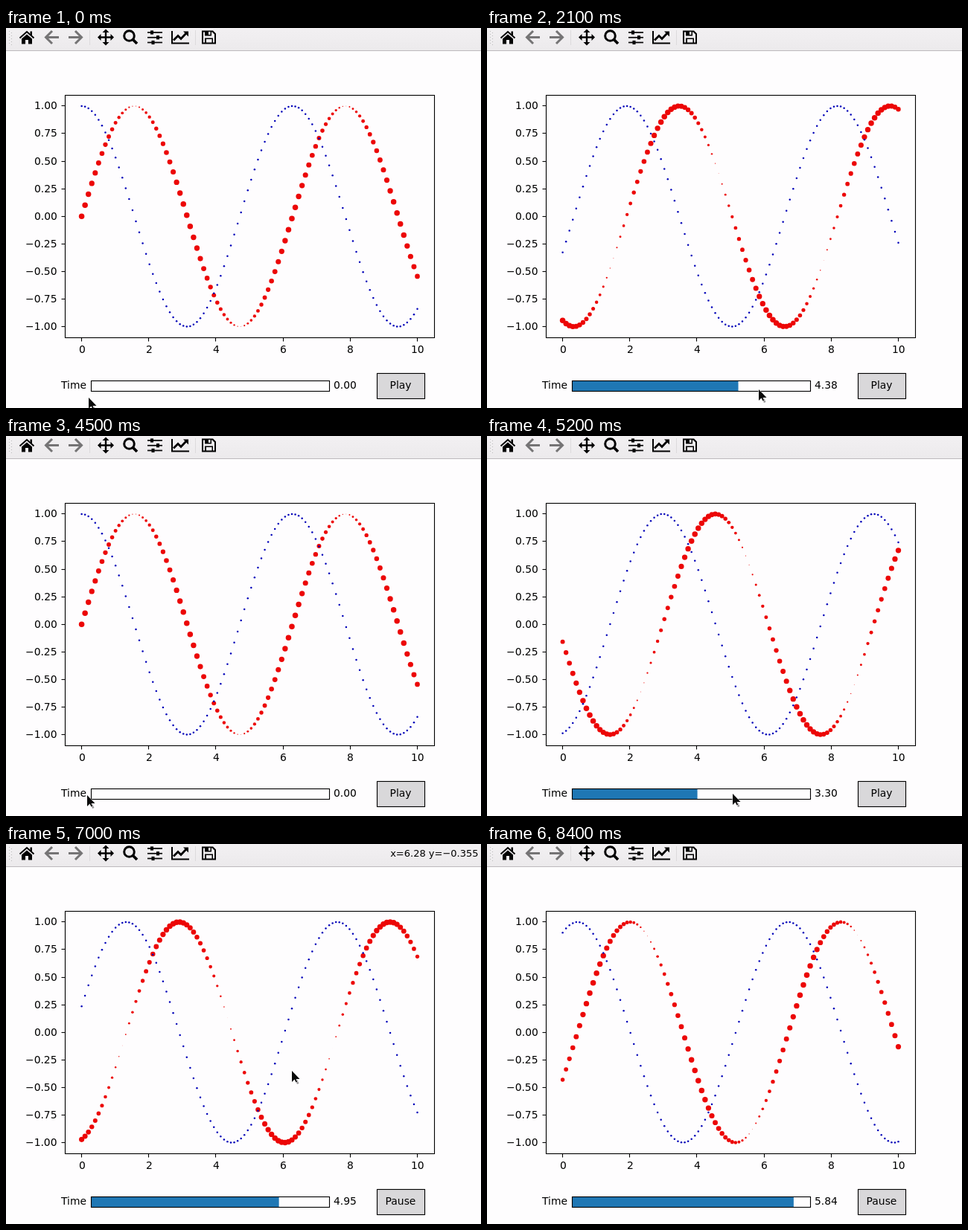
These frames come from a looping animation (638 by 511 pixels, 8600 ms). An HTML page with a canvas:

```html
<!DOCTYPE html>
<html lang="en">
<head>
<meta charset="utf-8">
<title>Scatter and line animation</title>
<style>
html, body { margin: 0; width: 100%; height: 100%; overflow: hidden; background: #fefdfe; }
canvas { display: block; }
</style>
</head>
<body>
<canvas id="stage" width="638" height="511"></canvas>
<script>
const ctx = document.getElementById('stage').getContext('2d');
const LOOP = 8600, TICK = 100, STEPS = 99, POINTS = 100;
const FONT = '"DejaVu Sans", sans-serif';
const slider = { x: 114.5, y: 474.5, w: 320, h: 14 };
const button = { x: 498.5, y: 464.5, w: 64, h: 34 };
const plot = { x: 79.5, y: 90.5, w: 496, h: 326 };
const start = performance.now();

// Cursor moves, each eased to its end point
const home = { x: 111, y: 497 };
const moves = [
  { from: 200, to: 500, x: 120, y: 494 },
  { from: 700, to: 800, x: 122, y: 482 },
  { from: 1300, to: 2250, x: 382, y: 486 },
  { from: 2300, to: 3100, x: 302, y: 474 },
  { from: 3200, to: 4400, x: 109, y: 483 },
  { from: 4500, to: 5900, x: 550, y: 478 },
  { from: 6400, to: 7600, x: 218, y: 131 },
  { from: 7700, to: 8000, x: 190, y: -60 }
];
const DRAG = 1300, RELEASE = 71, PLAY = 6200;

const clamp = (v, lo, hi) => Math.min(hi, Math.max(lo, v));
const smooth = u => u * u * (3 - 2 * u);
const inside = (p, b) => p.x >= b.x && p.x <= b.x + b.w && p.y >= b.y && p.y <= b.y + b.h;

function cursorAt(ms) {
  let { x, y } = home;
  for (const m of moves) {
    const s = smooth(clamp((ms - m.from) / (m.to - m.from), 0, 1));
    x += (m.x - x) * s;
    y += (m.y - y) * s;
  }
  return { x, y };
}

// The slider trails the drag by one tick, then playback adds one step per tick
function stepAt(ms) {
  if (ms < DRAG) return 0;
  if (ms > PLAY) return RELEASE + (ms - PLAY) / TICK - 1;
  const dragged = Math.round((cursorAt(ms - TICK).x - slider.x) / slider.w * STEPS);
  return clamp(dragged, 0, ms < moves[5].from ? STEPS : RELEASE);
}

const px = x => 101.6 + x * 45.09;
const py = y => 253.2 - y * 148.3;
const snap = v => Math.floor(v) + 0.5;

function text(str, x, y, align = 'left', size = 13.89) {
  ctx.font = size + 'px ' + FONT;
  ctx.textAlign = align;
  ctx.fillStyle = '#000';
  ctx.fillText(str, x, y);
}

function rect(x, y, w, h, fill) {
  ctx.fillStyle = fill;
  ctx.fillRect(x, y, w, h);
}

function box({ x, y, w, h }) {
  ctx.strokeStyle = '#000';
  ctx.lineWidth = 1.11;
  ctx.strokeRect(x, y, w, h);
}

function dot(x, y, r, fill) {
  ctx.fillStyle = fill;
  ctx.beginPath();
  ctx.arc(x, y, r, 0, 2 * Math.PI);
  ctx.fill();
}

function line(color, width, ...pts) {
  ctx.strokeStyle = color;
  ctx.lineWidth = width;
  ctx.beginPath();
  for (let i = 0; i < pts.length; i += 2) ctx.lineTo(pts[i], pts[i + 1]);
  ctx.stroke();
}

function shape(d, fill) {
  ctx.fillStyle = fill;
  ctx.fill(new Path2D(d), 'evenodd');
}

// Icon pieces reused by mirroring or turning about a centre
function turned(x, y, angle, paint) {
  ctx.save();
  ctx.translate(x, y);
  ctx.rotate(angle);
  paint();
  ctx.restore();
}

function toolbar() {
  const ink = '#000', dim = '#757475';
  const shade = ctx.createLinearGradient(0, 0, 0, 30);
  shade.addColorStop(0, '#f2f0f2');
  shade.addColorStop(1, '#eceaec');
  rect(0, 0, 638, 30, shade);
  rect(0, 30, 638, 1, '#bdbabd');
  for (let y = 4; y < 23; y += 4) {
    rect(4, y, 1, 1, '#bbb');
    rect(7, y + 2, 1, 1, '#bbb');
  }
  for (const x of [112, 254]) rect(x, 3, 1, 20, '#dcdadc');

  // home
  line(ink, 2, 18.5, 13.5, 28, 5, 37.5, 13.5);
  shape('M28 8.5L35 14.5V21.5H30V16H26V21.5H21V14.5ZM32.5 4.5H35V10.5L32.5 8.5Z', ink);

  // back and forward
  for (const [x, angle] of [[62, 0], [93, Math.PI]]) {
    turned(x, 12.5, angle, () => {
      line(dim, 3, 0, -8.5, -8.5, 0, 0, 8.5);
      line(dim, 3, -8, 0, 9, 0);
    });
  }

  // pan
  for (let i = 0; i < 4; i++) {
    turned(134, 12.5, i * Math.PI / 2, () => {
      line(ink, 2.4, 0, 0, 0, -8);
      shape('M0 -11L4.5 -6.5H-4.5Z', ink);
    });
  }

  // zoom
  ctx.strokeStyle = ink;
  ctx.lineWidth = 3;
  ctx.beginPath();
  ctx.arc(165.5, 10.5, 6.8, 0, 2 * Math.PI);
  ctx.stroke();
  line(ink, 3.8, 170, 15, 176, 21);

  // subplots
  [196, 204, 197.5].forEach((x, i) => {
    const y = 6 + i * 6.75;
    line(ink, 1.7, 190, y, 210, y);
    rect(x - 2, y - 2.6, 4, 5.2, ink);
  });

  // chart
  line(ink, 2, 223, 4, 223, 20.5, 246, 20.5);
  line(ink, 2.8, 225, 16.5, 231, 10.5, 235, 14.5, 242, 7);
  shape('M238 4.5H245V11.5Z', ink);

  // save
  shape('M263 3.5H278L282 7.5V21.5H263ZM265 5.5V19.5H280V8.5L277 5.5H276V10.5H267V5.5ZM267 13.5H278V19.5H267ZM269 15V19.5H276.5V15ZM272 5H274.5V9H272Z', ink);
}

function axes() {
  box(plot);
  for (let x = 0; x <= 10; x += 2) {
    const X = snap(px(x));
    line('#000', 1.11, X, 417, X, 421.5);
    text(String(x), Math.floor(px(x) - (x < 10 ? 3.5 : 8)), 437);
  }
  for (let i = -4; i <= 4; i++) {
    const Y = snap(py(i / 4));
    line('#000', 1.11, 74.5, Y, 79, Y);
    const label = Math.abs(i / 4).toFixed(2);
    if (i < 0) text('\u2212' + label, 26, Math.round(Y + 4.6));
    else text(label, 38, Math.round(Y + 4.6));
  }
}

function series(t) {
  const xs = Array.from({ length: POINTS }, (_, i) => i * 10 / (POINTS - 1));
  for (const x of xs) {
    const r = 3.75 * Math.abs(Math.cos(x - 5 * t)) ** 0.65;
    dot(px(x), py(Math.sin(x + t)), r, '#ec0606');
  }
  for (const x of xs) dot(px(x), py(Math.cos(x + t)), 1.25, '#0000b8');
}

function controls(t, step, ms, cursor) {
  text('Time', 108, 485, 'right');
  rect(slider.x, slider.y, slider.w * step / STEPS, slider.h, '#1f77b4');
  box(slider);
  text(t.toFixed(2), 440, 485);
  rect(button.x, button.y, button.w, button.h, inside(cursor, button) ? '#f2f1f3' : '#d9d8da');
  box(button);
  text(ms < PLAY ? 'Play' : 'Pause', 530, 485, 'center');
}

function pointer({ x, y }) {
  ctx.save();
  ctx.translate(Math.round(x) - 0.5, Math.round(y));
  shape('M5 12L7.5 18L10 17L7.5 11.5Z', '#9a989a');
  const arrow = new Path2D('M0.5 0V15L4 11.5L6 15.5L7.6 14.8L6 11H11Z');
  ctx.strokeStyle = '#fff';
  ctx.lineWidth = 1;
  ctx.stroke(arrow);
  ctx.fillStyle = '#0a0a0a';
  ctx.fill(arrow);
  ctx.restore();
}

function status({ x, y }) {
  const dx = (x + 0.8 - px(0)) / 45.09, dy = (py(0) - y - 1.4) / 148.3;
  const sign = dy < 0 ? '\u2212' : '';
  text(`x=${dx.toFixed(2)} y=${sign}${Math.abs(dy).toFixed(3)}`, 634.5, 17, 'right', 13);
}

function draw() {
  const ms = Math.floor((performance.now() - start) % LOOP / TICK) * TICK;
  const step = stepAt(ms), t = step * 2 * Math.PI / STEPS;
  const cursor = cursorAt(ms);
  rect(0, 0, 638, 511, '#fefdfe');
  toolbar();
  series(t);
  axes();
  controls(t, step, ms, cursor);
  if (inside(cursor, plot)) status(cursor);
  pointer(cursor);
  requestAnimationFrame(draw);
}
draw();
</script>
</body>
</html>
```
